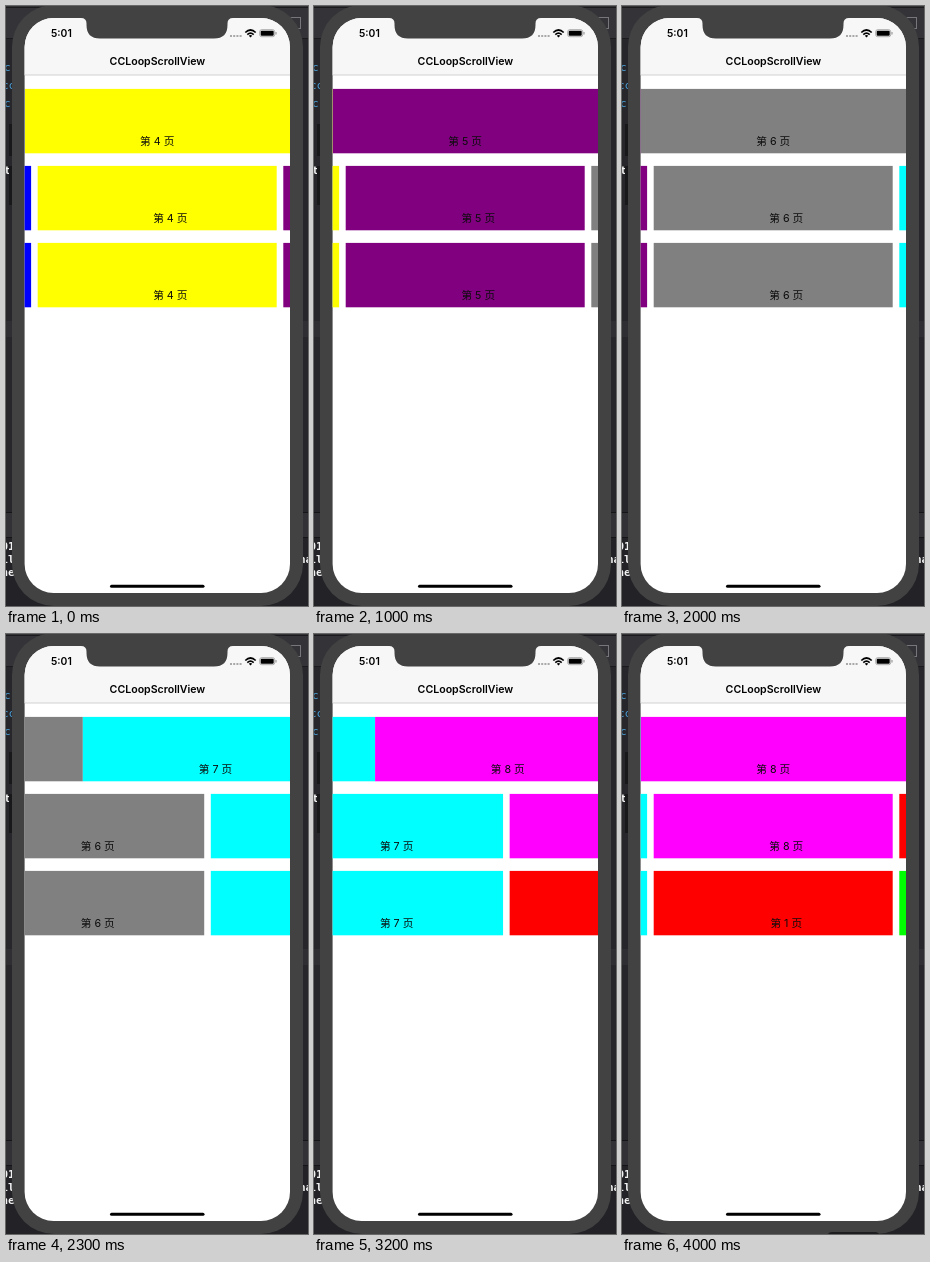
An HTML page for the animation above (4.1 s loop, 302x600 px).

```html
<!DOCTYPE html>
<html lang="zh">
<head>
<meta charset="utf-8">
<style>
  html, body { margin: 0; width: 100%; height: 100%; overflow: hidden; background: #26262b; }
  svg { display: block; width: 302px; height: 600px; }
  text { font-family: Inter, "Noto Sans CJK SC", "Noto Sans CJK", sans-serif; white-space: pre; }
  .code { font: 11px "DejaVu Sans Mono", monospace; fill: #4b9fd6; }
  .log { font: bold 11px "DejaVu Sans Mono", monospace; fill: #f2f2f2; }
  .page { font-size: 10.7px; text-anchor: middle; fill: #0c0c0c; }
  .bold { font-weight: 600; fill: #000; }
</style>
</head>
<body>
<svg viewBox="0 0 302 600">
  <defs>
    <clipPath id="screen"><rect x="18.6" y="12" width="265.4" height="575" rx="29"/></clipPath>
  </defs>

  <!-- editor window behind the phone -->
  <rect width="302" height="600" fill="#26262b"/>
  <rect width="302" height="32" fill="#343438"/>
  <path d="M0 1.5H302M0 32.5H302" stroke="#1b1b1e"/>
  <rect x="284.5" y="11.5" width="10" height="11" fill="none" stroke="#77777b"/>
  <text class="code" x="-2" y="65">c</text>
  <text class="code" x="-4" y="83">cc</text>
  <text class="code" x="-2" y="101">c</text>
  <text class="log" x="-2" y="168">t</text>
  <rect y="315" width="302" height="16" fill="#2e2e33"/>
  <rect y="506" width="302" height="26" fill="#313136"/>
  <path d="M0 506.5H302M0 531.5H302" stroke="#151517"/>
  <rect y="532" width="302" height="68" fill="#222227"/>
  <text class="log" x="-4.500" y="544">01</text>
  <text class="log" x="-4.500" y="557">ll</text>
  <text class="log" x="-4.500" y="570">ne</text>
  <text class="log" x="293" y="557">na</text>

  <!-- phone body -->
  <path d="M4.5 118V150M4.5 160V199" stroke="#18181a" stroke-width="3"/>
  <rect x="6" y="-1" width="291" height="601" rx="42" fill="#424242"/>
  <path id="hint" d="M206 600Q207 598 210 598H253Q256 598 257 600Z" fill="#1d1d1f"/>

  <g clip-path="url(#screen)">
    <rect x="18" y="12" width="267" height="576" fill="#fff"/>
    <rect x="18" y="12" width="267" height="57" fill="#f7f7f7"/>
    <path d="M18 69H285" stroke="#c6c6c7" stroke-width=".8"/>
    <g id="rows"></g>
    <path d="M75 11V12Q80.500 12 80.500 17.500V19Q80.500 32.500 94 32.500H208Q221.500 32.500 221.500 19V17.500Q221.500 12 227 12V11Z" fill="#424242"/>
  </g>

  <text class="bold" x="45" y="31" font-size="10.3">5:01</text>
  <text class="bold" x="151.400" y="59" font-size="10.6" text-anchor="middle">CCLoopScrollView</text>
  <path d="M224 30H236" stroke="#a9a9a9" stroke-width="2" stroke-dasharray="2 1.2"/>
  <g fill="none" stroke="#000" stroke-width="1.7">
    <path d="M239.300 26.500Q244.500 21.500 249.700 26.500"/>
    <path d="M241.300 28.600Q244.500 25.800 247.700 28.600"/>
  </g>
  <path d="M242.800 29.700Q244.500 28.400 246.200 29.700L244.500 31.400Z"/>
  <rect x="253.700" y="23.700" width="15" height="7" rx="2" fill="none" stroke="#8c8c8c" stroke-width=".7"/>
  <rect x="254.700" y="24.700" width="13" height="5" rx="1"/>
  <path d="M270 26V28.500" stroke="#8c8c8c"/>
  <path d="M105.500 580.300H197" stroke="#000" stroke-width="3" stroke-linecap="round"/>
</svg>

<script>
const LOOP = 4100, STEP = 100;
const STARTS = [0, 1100, 2100, 2986];
const COLORS = ["red", "lime", "blue", "yellow", "purple", "gray", "cyan", "magenta"];
const LABEL_X = 132.6, CARD_H = 64.4;
const ROWS = [
  { y: 82.9,  x: 18.6, width: 265.4, pitch: 265.4, pages: 8, duration: 290 },
  { y: 159.9, x: 31.7, width: 239,   pitch: 245.6, pages: 8, duration: 547 },
  { y: 236.9, x: 31.7, width: 239,   pitch: 245.6, pages: 7, duration: 547 }
];

const add = (parent, tag, attrs = {}) => {
  const node = document.createElementNS("http://www.w3.org/2000/svg", tag);
  for (const key in attrs) node.setAttribute(key, attrs[key]);
  return parent.appendChild(node);
};
const ease = u => (1 - Math.cos(Math.PI * Math.min(1, Math.max(0, u)))) / 2;

const rowLayer = document.getElementById("rows");
const hint = document.getElementById("hint");

// Pages 3 to 9 cover everything that passes through the view.
for (const row of ROWS) {
  row.group = add(rowLayer, "g");
  for (let page = 3; page <= 9; page++) {
    const index = (page - 1) % row.pages;
    const x = row.x + (page - 4) * row.pitch;
    add(row.group, "rect", { x, y: row.y, width: row.width, height: CARD_H, fill: COLORS[index] });
    add(row.group, "text", { x: x + LABEL_X, y: row.y + 55.8, class: "page" })
      .textContent = `第 ${index + 1} 页`;
  }
}

function render(time) {
  const t = Math.floor((time % LOOP) / STEP) * STEP;
  for (const row of ROWS) {
    const turned = STARTS.reduce((sum, start) => sum + ease((t - start) / row.duration), 0);
    row.group.setAttribute("transform", `translate(${-turned * row.pitch} 0)`);
  }
  hint.setAttribute("visibility", t >= 4000 ? "visible" : "hidden");
}

const origin = performance.now();
function tick() {
  render(performance.now() - origin);
  requestAnimationFrame(tick);
}
tick();
</script>
</body>
</html>
```
